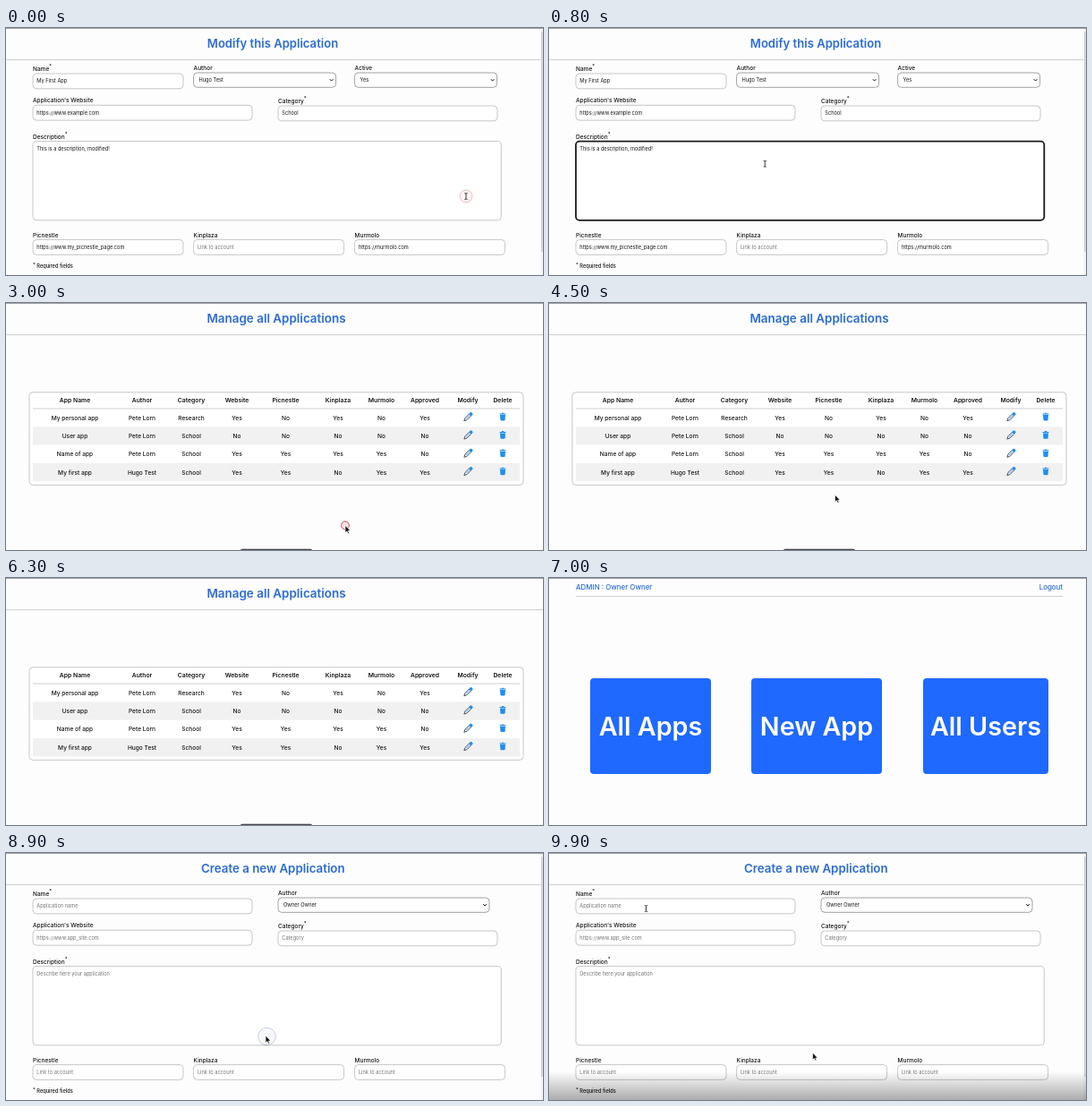
An HTML page that plays this animation: 600 by 276 pixels, repeating every 10 s.

```html
<!DOCTYPE html>
<html lang="en">
<head>
<meta charset="utf-8">
<title>Application manager</title>
<style>
  html, body { margin: 0; width: 100%; height: 100%; overflow: hidden; background: #fdfdfd; }
  svg { display: block; width: 100vw; height: 100vh; }
  text { font-family: Inter, "Open Sans", sans-serif; fill: #151515; white-space: pre; }
  .title { font-weight: 600; fill: #2a6bd8; text-anchor: middle; }
  .label { font-size: 6.5px; font-weight: 500; }
  .value { font-size: 5.65px; }
  .hint { font-size: 5.65px; fill: #757575; }
  .head { font-size: 6.8px; font-weight: 600; text-anchor: middle; }
  .cell { font-size: 6.6px; font-weight: 500; text-anchor: middle; }
  .card { font-size: 28.7px; font-weight: 600; fill: #fff; text-anchor: middle; }
  .nav { font-size: 7.9px; font-weight: 500; fill: #2a6bd8; }
  .box { fill: #fff; stroke: #b9b9b9; stroke-width: .8; }
  .rule { stroke: #cfcfcf; stroke-width: 1; }
</style>
</head>
<body>
<svg id="stage" viewBox="0 0 600 276" preserveAspectRatio="none">
  <defs>
    <filter id="blur" x="-20%" y="-20%" width="140%" height="140%"><feGaussianBlur stdDeviation="4"/></filter>
    <linearGradient id="shade" x1="0" y1="0" x2="0" y2="1">
      <stop offset="0" stop-color="#000" stop-opacity="0"/>
      <stop offset="1" stop-color="#000" stop-opacity=".32"/>
    </linearGradient>
    <clipPath id="selClip"><rect id="selArea" x="34" y="130" width="0" height="9.2"/></clipPath>
    <g id="pencil" transform="rotate(45)">
      <path d="M-1.5 -3.2V3.2L0 6.3L1.5 3.2V-3.2Z" fill="#fff" stroke="#3d4a5c" stroke-width=".9" stroke-linejoin="round"/>
      <path d="M-1.8 -3.2V-5.2Q-1.8 -6.3 -.8 -6.3H.8Q1.8 -6.3 1.8 -5.2V-3.2Z" fill="#1e8ff0"/>
      <path d="M0 -3V3" stroke="#1e8ff0" stroke-width=".8"/>
    </g>
    <g id="bin" fill="#1e8ff0">
      <path d="M-3.5 -3.6H-1.4L-.9 -4.4H.9L1.4 -3.6H3.5V-2.6H-3.5Z"/>
      <path d="M-3 -2.1H3L2.6 3.4Q2.5 4.2 1.7 4.2H-1.7Q-2.5 4.2 -2.6 3.4Z"/>
    </g>
    <path id="arrow" d="M0 0V8.2L1.9 6.5L3.1 9.2L4.5 8.6L3.3 6H5.8Z" fill="#111" stroke="#fff" stroke-width=".7"/>
    <path id="beam" d="M-1.6 -3.5Q0 -3.5 0 -2.5Q0 -3.5 1.6 -3.5M0 -2.5V2.5M-1.6 3.5Q0 3.5 0 2.5Q0 3.5 1.6 3.5" fill="none" stroke="#222" stroke-width=".9"/>
    <path id="hand" d="M-.8 -3.4Q0 -4.4 .8 -3.4V-.5L3 0Q4 .4 3.8 1.6L3 4.8H-1.3L-3.2 1.8Q-3.2 .6 -2 1L-.8 2Z" fill="#fff" stroke="#111" stroke-width=".8" stroke-linejoin="round"/>
  </defs>
  <rect width="600" height="276" fill="#fdfdfd"/>
  <g id="modify"></g>
  <g id="manage"></g>
  <g id="home"></g>
  <g id="create"></g>
  <rect width="600" height="1" fill="#a3a3a3"/>
  <g id="player">
    <rect y="244" width="600" height="32" fill="url(#shade)"/>
    <use href="#arrow" x="294.5" y="223"/>
  </g>
  <circle id="ring"/>
  <use id="cursor"/>
</svg>
<script>
const LOOP = 10000, STEP = 100;
const $ = id => document.getElementById(id);
const text = (cls, x, y, str, extra = '') => `<text class="${cls}" x="${x}" y="${y}" ${extra}>${str}</text>`;
const box = (x, y, w, h, extra = '') => `<rect class="box" x="${x}" y="${y}" width="${w}" height="${h}" rx="4" ${extra}/>`;
const rule = (x1, x2, y) => `<path class="rule" d="M${x1} ${y}H${x2}"/>`;
const title = (x, size, str) => text('title', x, 22.2, str, `font-size="${size}"`) + rule(0, 600, 35.5);
const star = '<tspan dy="-2.6" font-size="5.5">*</tspan>';

function field(x, y, w, name, str, cls = 'value') {
  return text('label', x, y - 3, name) + box(x, y, w, 16.8) + text(cls, x + 4.3, y + 10.3, str);
}
function select(x, w, name, str) {
  const cx = x + w - 5;
  return text('label', x, 47, name) + box(x, 50, w, 16.3, 'style="stroke:#8c8c8c"') +
    text('value', x + 6, 60.3, str) +
    `<path d="M${cx - 1.8} 57.2l1.8 1.9l1.8 -1.9" fill="none" stroke="#111" stroke-width="1"/>`;
}
function form({ site, category, about, links, cls }) {
  const names = ['Picnestle', 'Kinplaza', 'Murmolo'];
  return field(30, 86.3, 245, 'Application\'s Website', site, cls) +
    field(304, 87, 245, 'Category' + star, category, cls) +
    text('label', 30, 124, 'Description' + star) +
    box(30, 126.6, 523.3, 88.2, 'data-area') + text(cls, 34.3, 136.7, about) +
    names.map((n, i) => field([30, 209.6, 389.6][i], 236.6, 168, n,
      links[i] || 'Link to account', links[i] ? 'value' : 'hint')).join('') +
    text('value', 30, 268.4, '<tspan dy="-1.6">*</tspan><tspan dy="1.6" font-weight="500"> Required fields</tspan>') +
    '<rect x="597.4" y="1" width="2.6" height="275" fill="#f3f3f3"/><rect x="598.2" y="4" width="1.3" height="246" rx=".6" fill="#c4c4c4"/>';
}

const about = 'This is a description, modified!';
$('modify').innerHTML = title(298, 13.1, 'Modify this Application') +
  field(30, 51, 168, 'Name' + star, 'My First App') +
  select(209.6, 159, 'Author', 'Hugo Test') + select(389.6, 159, 'Active', 'Yes') +
  form({ site: 'https://www.example.com', category: 'School', about, cls: 'value',
    links: ['https://www.my_picnestle_page.com', '', 'https://murmolo.com'] }) +
  '<rect id="sel" x="34" y="130" width="0" height="9.2" fill="#2f83e6"/>' +
  text('value', 34.3, 136.7, about, 'id="selText" clip-path="url(#selClip)" style="fill:#fff"');

$('create').innerHTML = title(298.3, 13.3, 'Create a new Application') +
  field(30, 51, 245, 'Name' + star, 'Application name', 'hint') +
  select(304, 236, 'Author', 'Owner Owner') +
  form({ site: 'https://www.app_site.com', category: 'Category',
    about: 'Describe here your application', cls: 'hint', links: [] });

const cols = [77, 152, 207, 258, 312.5, 371, 419.5, 468, 516, 555];
const heads = 'App Name,Author,Category,Website,Picnestle,Kinplaza,Murmolo,Approved,Modify,Delete'.split(',');
const rows = [
  'My personal app,Pete Lorn,Research,Yes,No,Yes,No,Yes',
  'User app,Pete Lorn,School,No,No,No,No,No',
  'Name of app,Pete Lorn,School,Yes,Yes,Yes,Yes,No',
  'My first app,Hugo Test,School,Yes,Yes,No,Yes,Yes'
];
$('manage').innerHTML = title(302, 13.45, 'Manage all Applications') +
  box(26, 99.8, 552, 103.6) +
  heads.map((h, i) => text('head', cols[i], 110.8, h)).join('') +
  rows.map((row, r) => {
    const y = 118 + r * 20.3;
    const band = r % 2 ? `<rect x="30" y="${y}" width="544" height="20.3" fill="#f1f1f1"/>` : '';
    return band + row.split(',').map((c, i) => text('cell', cols[i], y + 12.6, c)).join('') +
      `<use href="#pencil" x="0" y="0" transform="translate(516.3 ${y + 9.3})"/>` +
      `<use href="#bin" x="555" y="${y + 9.2}"/>`;
  }).join('') + rule(30, 574, 118) +
  '<rect x="261.5" y="274.8" width="81" height="8" rx="3" fill="#4a4a4a"/>';

const cards = [[46, 135, 'All Apps'], [226, 146, 'New App'], [418, 140, 'All Users']];
const panel = (x, w, extra = '') =>
  `<rect x="${x}" y="112" width="${w}" height="107" rx="4" fill="#1f69ff" ${extra}/>`;
$('home').innerHTML = text('nav', 30, 13.3, 'ADMIN : Owner Owner') +
  text('nav', 574, 13.3, 'Logout', 'text-anchor="end"') + rule(30, 574, 20.5) +
  `<g id="glow"><rect x="222" y="108" width="154" height="115" rx="7" fill="#4f8dff" filter="url(#blur)"/></g>` +
  cards.map(([x, w, s]) => panel(x, w) + text('card', x + w / 2, 176, s)).join('');

const scenes = [[0, 'modify'], [2600, 'manage'], [7000, 'home'], [8900, 'create']];
// time, x, y, pointer shape from then on
const path = [
  [0, 514, 188, 'beam'], [300, 514, 188, 'beam'], [1100, 115, 135, 'beam'],
  [1200, 115, 135, 'beam'], [1600, 34, 135, 'beam'], [1700, 34, 135, ''],
  [2000, 300, 180, 'beam'], [2500, 370, 238, 'arrow'], [2900, 379, 248.5, 'arrow'],
  [3100, 379, 248.5, 'arrow'], [3400, 372, 222, 'arrow'], [3600, 372, 222, 'arrow'],
  [4600, 318, 214, 'arrow'], [5400, 302, 277, 'arrow'], [5500, 302, 277, ''],
  [8100, 302, 276, 'arrow'], [8400, 294, 214, 'hand'], [8500, 292, 208.5, 'hand'],
  [8800, 292, 208.5, 'hand'], [8900, 290, 204, 'arrow'], [9500, 125, 76, 'beam'],
  [9800, 108.5, 62, 'beam'], [LOOP, 108.5, 62, 'beam']
];
// start time, x, y, colour
const clicks = [[-200, 514, 188, '#e88'], [2950, 379, 248.5, '#c8383c'], [8530, 291.5, 205, '#23408c']];

const clamp = v => Math.max(0, Math.min(1, v));
const ease = v => v * v * (3 - 2 * v);
const set = (el, attrs) => { for (const k in attrs) el.setAttribute(k, attrs[k]); };

function pointer(t) {
  let i = 0;
  while (i < path.length - 2 && path[i + 1][0] <= t) i++;
  const [t0, x0, y0, kind] = path[i], [t1, x1, y1] = path[i + 1];
  const k = ease(clamp((t - t0) / (t1 - t0)));
  return { x: x0 + (x1 - x0) * k, y: y0 + (y1 - y0) * k, kind };
}

const area = document.querySelector('#modify [data-area]');

function draw(t) {
  const scene = scenes.filter(s => s[0] <= t).pop()[1];
  scenes.forEach(([, id]) => set($(id), { display: id === scene ? 'inline' : 'none' }));

  const p = pointer(t);
  set($('cursor'), { href: '#' + (p.kind || 'arrow'), x: p.x, y: p.y, display: p.kind ? 'inline' : 'none' });

  const click = clicks.find(c => t >= c[0] && t < c[0] + 500);
  set($('ring'), { display: click ? 'inline' : 'none' });
  if (click) {
    const age = t - click[0];
    set($('ring'), { cx: click[1], cy: click[2], r: 3.6 + age / 60, fill: click[3], 'fill-opacity': .15,
      stroke: click[3], 'stroke-width': 1, opacity: 1 - age / 500 });
  }

  if (scene === 'modify') {
    const focused = t >= 100;
    area.style.stroke = focused ? '#1c1c1c' : '';
    area.style.strokeWidth = focused ? 1.8 : '';
    const full = $('selText').getComputedTextLength() + .6;
    const w = full * ease(clamp((t - 1200) / 400));
    [$('sel'), $('selArea')].forEach(el => set(el, { x: 34 + full - w, width: w }));
  }
  set($('glow'), { opacity: clamp((t - 8200) / 300) });
  set($('player'), { opacity: clamp((t - 9500) / 300) });
}

function tick(now) {
  draw(Math.floor(now % LOOP / STEP) * STEP);
  requestAnimationFrame(tick);
}
draw(0);
requestAnimationFrame(tick);
</script>
</body>
</html>
```
